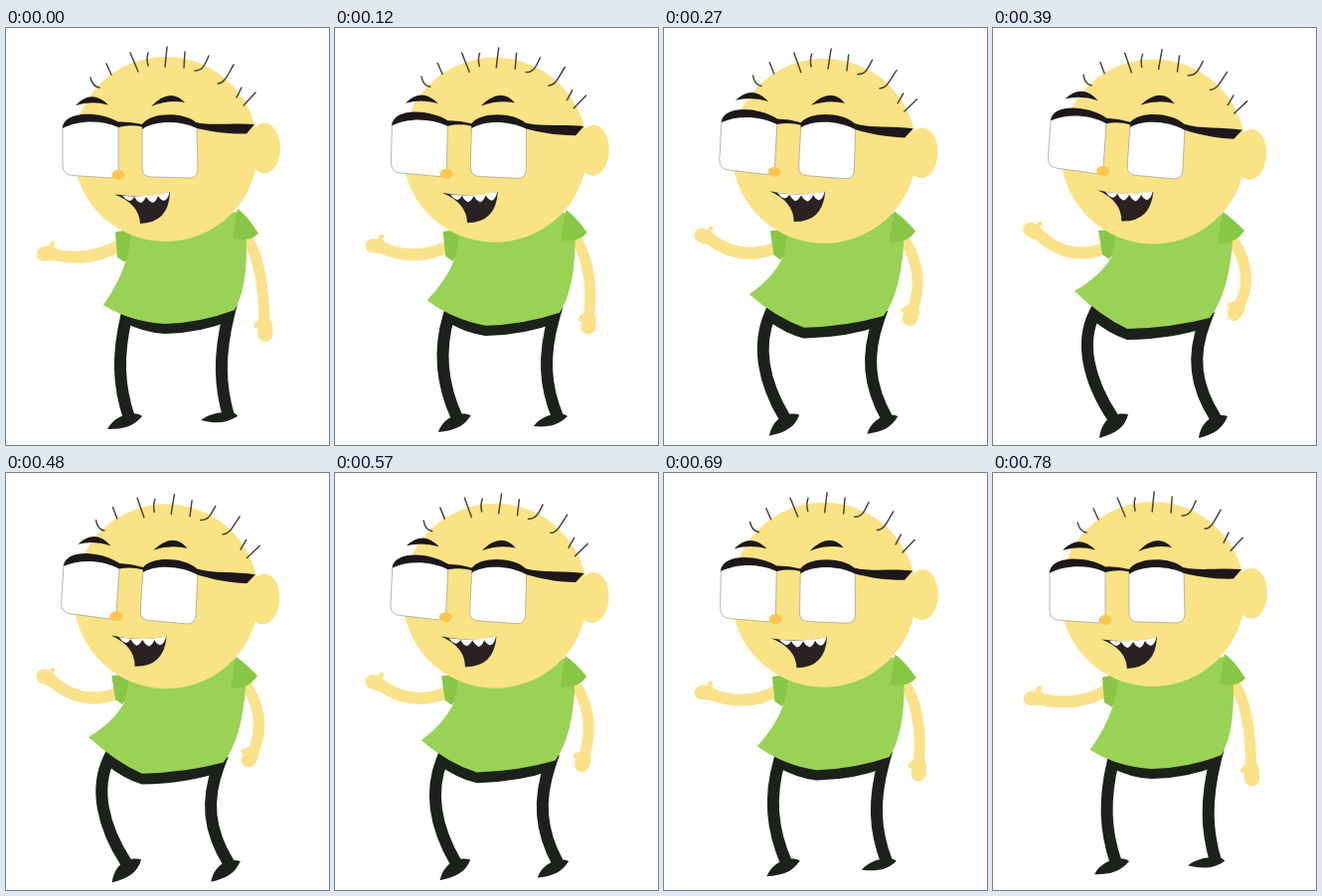
An HTML page for the animation above (0.81 s loop, 325 by 420 pixels).

```html
<!DOCTYPE html>
<html lang="en">
<head>
<meta charset="utf-8">
<title>Dancing man</title>
<style>
  html, body { margin: 0; width: 100%; height: 100%; overflow: hidden; background: #fff; }
  svg { display: block; width: 325px; height: 420px; }
  .skin { fill: #fae385; }
  .limb { fill: none; stroke: #fae28a; stroke-linecap: round; }
  .dark { fill: #1d171a; }
  .mouth { fill: #292122; }
  .pants { fill: none; stroke: #1c211b; }
  .foot { fill: #1c211b; }
  .shirt { fill: #99d255; }
  .sleeve { fill: #88c745; }
  .lens { fill: #fefefe; stroke: #aaa69a; stroke-width: .8; }
  .hair { fill: none; stroke: #4b463c; stroke-width: 1.5; stroke-linecap: round; }
</style>
</head>
<body>
<svg viewBox="0 0 325 420">
  <g id="body"></g>
  <g id="skull">
    <ellipse class="skin" cx="160.5" cy="122" rx="93" ry="93"/>
    <path class="hair" d="M85 50Q87 59 94 60M101 36L106 47M125 25L133 44M143 25Q141 31 143 38M162 19L160 39M180 24L179 40M204 28C200 37 198 43 190 43M229 37C223 47 220 56 213 56M237 60L232 70M251 65L239 78"/>
  </g>
  <g id="face">
    <ellipse class="skin" cx="260" cy="121" rx="16" ry="25.5"/>
    <path class="dark" d="M70 78Q86 61 103 77.500Q86 73 70 78ZM146 79Q165 59 180 75Q163 72 146 79Z"/>
    <path class="lens" d="M57 98Q84 89 113 97V143Q113 151 105 151L67 148.500Q57 148 57 138ZM137 99Q164 89 192 97L193 142Q193 151 184 151L146 150Q137 150 137 141Z"/>
    <path class="dark" d="M57 101C57 84 92 82.500 113 94.500Q125 94 137 97C145 85 178 84 191 95C207 99 230 95 250 97L242 106.500C220 107 205 104 192 101C175 93 150 93 137 102V99.500Q125 97 113 100C95 92 72 93 57 101Z"/>
    <ellipse cx="113" cy="148" rx="6.500" ry="5" fill="#ffc64f"/>
    <path class="mouth" d="M109 167.500Q140 172 165 165Q164 196 135 197Q134 177 109 167.500Z"/>
    <path fill="#fff" d="M117 168.800Q141 171 164.500 165Q163 173 159 174Q155 173 153 169Q151 175 147.500 176Q143 174 141 170Q138 176 135 176Q131 174 129 170Q127 174 124 174Q120 173 117 168.800Z"/>
  </g>
</svg>
<script>
const LOOP = 810, STEP = 30;

// [class, stroke width, upright pose, leaning pose]
const parts = [
  ['limb', 11, 'M244 214Q259 240 260 296', 'M243 216Q264 250 247 281'],
  ['limb', 15, 'M260.5 299L261 308.5', 'M246 282L243 287.5'],
  ['limb', 5, 'M257 294L251.500 300', 'M244 277L238 279'],
  ['limb', 12, 'M118 217Q85 237 47 228', 'M115 221Q76 237 45 207'],
  ['limb', 14.5, 'M38 227.5L45 227', 'M37.500 203L43 206'],
  ['limb', 4.5, 'M49 224Q43 220 47 217', 'M49 207Q43 201 47 197'],
  ['pants', 12,
    'M124 393C113 360 112 330 121 291Q140 301 160 302Q196 301 224 289C214 330 215 360 224 391',
    'M121 393C95 354 88 316 102 288Q120 303 136 308Q180 307 213 296C200 330 203 360 224 393'],
  ['foot', 0, 'M102 404C110 389 130 385 137 391C128 401 120 404 102 404Z',
    'M107 413C109 395 121 386 136 389C133 402 124 408 107 413Z'],
  ['foot', 0, 'M196 395C208 385 232 385 233 391C222 398 212 399 196 395Z',
    'M207 413C209 396 223 387 236 391C231 404 222 409 207 413Z'],
  ['shirt', 0,
    'M111 205L126 203L232 185L242 214Q243 262 230 284Q196 297 160 298Q125 296 98 279Q113 258 121 234Z',
    'M107 204L124 203L230 187L241 216Q237 268 218 292Q180 302 135 303Q108 290 82 265Q108 250 119 231Z'],
  ['sleeve', 0, 'M110 206L126 203Q125 225 120 236L112 231Z',
    'M106 204L124 203Q122 225 117 233L110 228Z'],
  ['sleeve', 0, 'M233 182Q243 189 254 207Q245 216 228 212Z',
    'M231 185Q241 192 253 204Q244 218 226 217Z']
];

// time in ms, amount of lean
const lean = [[0, 0], [120, .34], [270, .76], [390, 1], [420, 1], [570, .7], [630, .48], [780, .02], [810, 0]];

const NS = 'http://www.w3.org/2000/svg';
const [body, skull, face] = ['body', 'skull', 'face'].map(id => document.getElementById(id));

const shapes = parts.map(([cls, width, from, to]) => {
  const el = document.createElementNS(NS, 'path');
  el.setAttribute('class', cls);
  if (width) el.setAttribute('stroke-width', width);
  body.append(el);
  return { el, from, ends: to.match(/[\d.]+/g).map(Number) };
});

const blend = (from, ends, p) => {
  let i = 0;
  return from.replace(/[\d.]+/g, n => (+n + (ends[i++] - n) * p).toFixed(2));
};

// monotone cubic through the table
const secant = i => (lean[i + 1][1] - lean[i][1]) / (lean[i + 1][0] - lean[i][0]);
const slope = i => {
  const a = secant(i ? i - 1 : lean.length - 2);
  const b = secant(i < lean.length - 1 ? i : 0);
  return a * b > 0 ? 2 * a * b / (a + b) : 0;
};
function leanAt(t) {
  const i = lean.findIndex((k, n) => n && t < k[0]) - 1;
  const [t0, a] = lean[i], [t1, b] = lean[i + 1];
  const h = t1 - t0, u = (t - t0) / h, v = 1 - u;
  return a * v * v * (1 + 2 * u) + b * u * u * (3 - 2 * u)
    + h * u * v * (v * slope(i) - u * slope(i + 1));
}

const tilt = (el, dx, dy, angle) =>
  el.setAttribute('transform', `translate(${dx} ${dy}) rotate(${angle} 160 122)`);

function draw(now) {
  const t = Math.floor((now % LOOP) / STEP) * STEP;
  const p = leanAt(t);
  for (const s of shapes) s.el.setAttribute('d', blend(s.from, s.ends, p));
  tilt(skull, .8 * p, 2.4 * p, 4 * p);
  tilt(face, -.6 * p, -.6 * p, 4 * p);
}

function tick() {
  draw(performance.now());
  requestAnimationFrame(tick);
}
tick();
</script>
</body>
</html>
```
